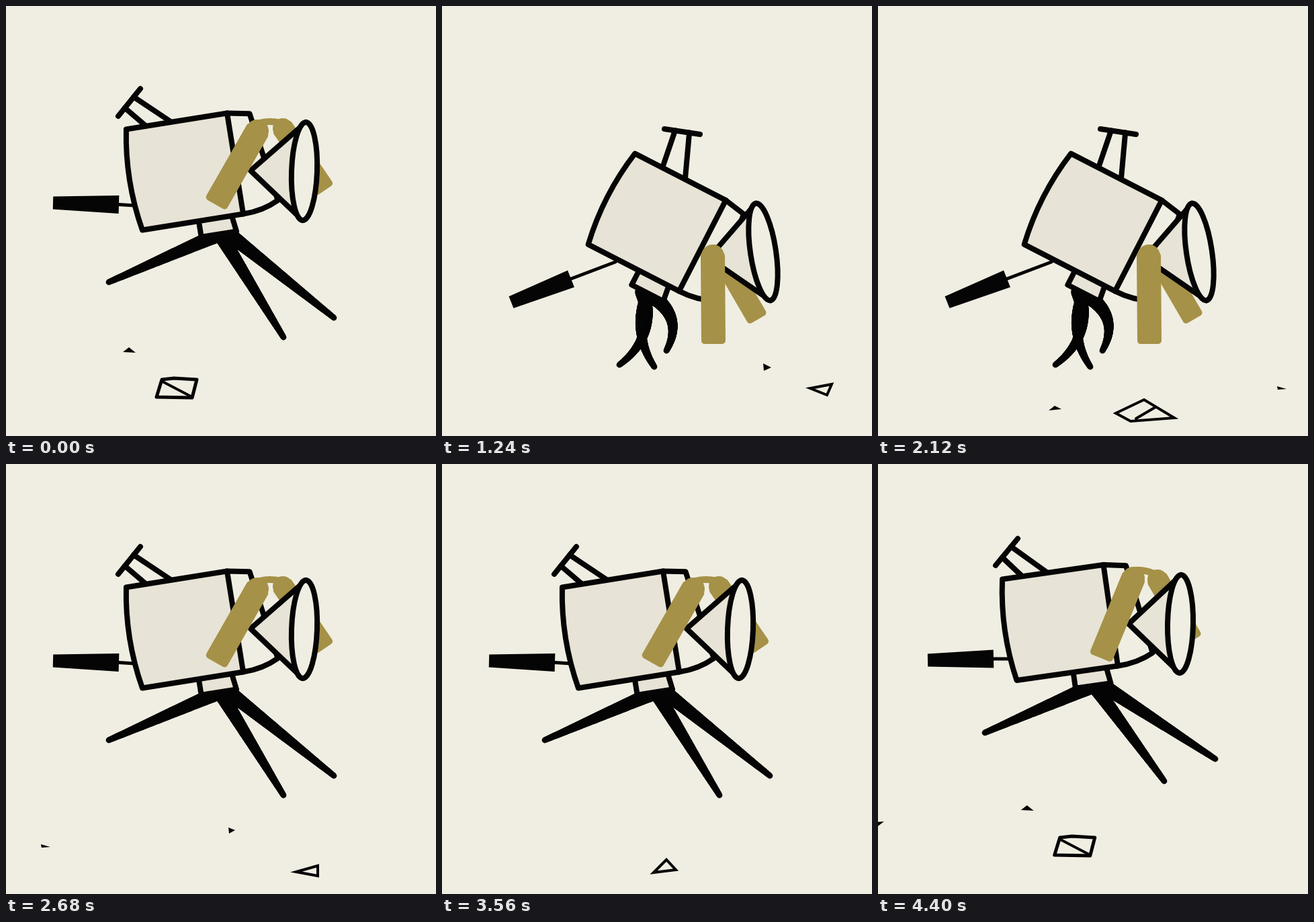
Recreate the animation shown at these times as an HTML page with a canvas. Size 640 by 640 pixels, loop 4.44 s.

```html
<!DOCTYPE html>
<html lang="en">
<head>
<meta charset="utf-8">
<title>Galloping camera</title>
<style>
html, body { margin: 0; width: 100%; height: 100%; overflow: hidden; background: #f0eee2; }
canvas { display: block; width: 100vmin; height: 100vmin; }
</style>
</head>
<body>
<canvas id="stage" width="640" height="640"></canvas>
<script>
const ctx = document.getElementById('stage').getContext('2d');
const PAPER = '#f0eee2', CREAM = '#e7e3d6', INK = '#060505', GOLD = '#a59147';
const LOOP = 4440, STEP = 40, STRIDE = LOOP / 5, DRAWINGS = 22, SPEED = 0.968;

// Each pose: body x y angle | lens x y angle, apex | handle bar, post | grip, rope end |
// three legs (tip, bend) | near strap, far strap
const reach = [266, 246.5, -9.1, 444, 246, 2, 364, 245,
  200, 123, 167, 164, -8, 70, 293, 168, 295.5, 192, 297,
  153, 411, 0, 413, 493, 0, 488, 464, 0,
  374, 186, 314, 291, 412, 182, 472, 270];
const gather = [320, 322, 27.2, 478, 366, -8.5, 397, 375,
  384, 191, 331, 183, 8, 103, 441, 192, 406, 258, 381,
  264, 534, 41, 316, 537, -30, 334, 513, 34,
  403, 372, 404, 498, 425, 388, 468, 462];
const leap = [299, 207, -1.9, 477.5, 217, 0, 394, 216,
  261, 71, 219, 103, -3, 104, 316, 196, 289, 224, 283,
  200, 420, 6, 478, 390, 0, 545, 338, 0,
  409, 158, 438, 277, 421, 152, 434, 242];
const fall = [271, 236, -8.1, 450, 238, 1, 373, 238,
  208, 111, 175, 151, -8, 74, 292, 172, 290, 195, 290,
  159, 400, 0, 426, 472, 0, 502, 439, 0,
  380, 170, 333, 284, 416, 172, 466, 258];
const poses = [reach, gather, leap, fall], keys = [0, 8, 14, 21];

// Ground shards: time at which the points apply, outline, optional inner line
const shards = [
  { at: 0, pts: [174, 515, 183, 508, 193, 516] },
  { at: 0, pts: [232, 556, 250, 554, 284, 556, 277, 583, 224, 582], line: [233, 559, 277, 582] },
  { at: 600, pts: [144, 615, 154, 610, 163, 618] },
  { at: 600, pts: [373, 512, 385, 513, 377, 518] },
  { at: 600, pts: [534, 611, 540, 602, 557, 605] },
  { at: 1240, pts: [478, 532, 490, 538, 479, 543] },
  { at: 1240, pts: [548, 569, 580, 563, 573, 579], line: [] },
  { at: 2120, pts: [254, 602, 263, 595, 273, 600] },
  { at: 2120, pts: [354, 606, 396, 586, 441, 613, 376, 618], line: [384, 614, 413, 597] },
  { at: 2120, pts: [594, 566, 608, 570, 595, 571] },
  { at: 2680, pts: [331, 541, 341, 545, 332, 550] },
  { at: 2680, pts: [432, 607, 464, 598, 464, 613], line: [] },
  { at: 3560, pts: [315, 608, 334, 589, 348, 604], line: [] },
  { at: 4400, pts: [-12, 534, 9, 532, 0, 539] }
];

const mod = (a, n) => ((a % n) + n) % n;

function paint(fill, width, stroke = INK) {
  if (fill) { ctx.fillStyle = fill; ctx.fill(); }
  if (width) { ctx.lineWidth = width; ctx.strokeStyle = stroke; ctx.stroke(); }
}

function trace(pts, closed) {
  ctx.beginPath();
  for (let i = 0; i < pts.length; i += 2) ctx.lineTo(pts[i], pts[i + 1]);
  if (closed) ctx.closePath();
}

function line(pts, width) { trace(pts); paint(null, width); }

// Four corners of a bar between two points with a half width at each end
function bar(ax, ay, bx, by, ha, hb) {
  const len = Math.hypot(bx - ax, by - ay), nx = (ay - by) / len, ny = (bx - ax) / len;
  trace([ax + nx * ha, ay + ny * ha, bx + nx * hb, by + ny * hb,
    bx - nx * hb, by - ny * hb, ax - nx * ha, ay - ny * ha], true);
}

// Cyclic cubic through the key poses
function poseAt(d) {
  const n = keys.length;
  const key = i => keys[mod(i, n)] + Math.floor(i / n) * DRAWINGS;
  let k = n - 1;
  while (keys[k] > d) k--;
  const h = key(k + 1) - key(k), s = (d - key(k)) / h;
  return reach.map((_, j) => {
    const val = i => poses[mod(i, n)][j];
    const rate = i => (val(i + 1) - val(i)) / (key(i + 1) - key(i));
    const slope = i => {
      const before = key(i) - key(i - 1), after = key(i + 1) - key(i);
      return (after * rate(i - 1) + before * rate(i)) / (before + after);
    };
    const a = val(k), b = val(k + 1), r = 1 - s;
    return a * (1 + 2 * s) * r * r + b * s * s * (3 - 2 * s)
      + h * s * r * (slope(k) * r - slope(k + 1) * s);
  });
}

function leg(base, x, y, bend) {
  const [bx, by] = base, dx = x - bx, dy = y - by, len = Math.hypot(dx, dy);
  const cx = (bx + x) / 2 + dy / len * bend, cy = (by + y) / 2 - dx / len * bend;
  ctx.fillStyle = INK;
  for (let i = 0; i <= 120; i++) {
    const s = i / 120, r = 1 - s;
    ctx.beginPath();
    ctx.arc(r * r * bx + 2 * r * s * cx + s * s * x, r * r * by + 2 * r * s * cy + s * s * y,
      11 - 6.6 * s, 0, 7);
    ctx.fill();
  }
}

function strap(ax, ay, bx, by, half) {
  bar(ax, ay, bx, by, half - 5, half - 5);
  paint(GOLD, 10, GOLD);
  ctx.beginPath();
  ctx.arc(ax, ay, half - 1, 0, 7);
  paint(GOLD);
}

function drawCamera(p) {
  const [cx, cy, deg, lx, ly, lensDeg, ax, ay, h1x, h1y, h2x, h2y, post,
    g1x, g1y, g2x, g2y, rx, ry] = p;
  const legs = p.slice(19, 28), near = p.slice(28, 32), far = p.slice(32);
  const rad = deg * Math.PI / 180, cos = Math.cos(rad), sin = Math.sin(rad);
  const at = (x, y) => [cx + x * cos - y * sin, cy + x * sin + y * cos];
  const corner = (...xy) => ctx.lineTo(...at(...xy));
  const curve = (qx, qy, x, y) => ctx.quadraticCurveTo(...at(qx, qy), ...at(x, y));

  // Crank
  line([g2x, g2y, rx, ry], 5);
  bar(g1x, g1y, g2x, g2y, 9.5, 13.5);
  paint(INK);

  // Tripod
  [28, 38, 50].forEach((x, i) => leg(at(x, 102), ...legs.slice(i * 3, i * 3 + 3)));
  trace([...at(9, 78), ...at(9, 100), ...at(62, 100), ...at(59, 78)]);
  paint(CREAM, 8);

  // Handle
  const dx = h2x - h1x, dy = h2y - h1y;
  line([h1x + dx * 0.3, h1y + dy * 0.3, ...at(post, -76)], 8);
  line([h1x + dx * 0.7, h1y + dy * 0.7, ...at(post - 38, -76)], 8);
  line([h1x, h1y, h2x, h2y], 8);

  // Front panel and box
  ctx.beginPath();
  corner(76, -76); corner(109, -70); corner(130, 64);
  curve(106, 76, 76, 76);
  paint(PAPER, 8);
  ctx.beginPath();
  corner(-76, -76); corner(76, -76); corner(76, 76); corner(-76, 76);
  curve(-90, 0, -76, -76);
  ctx.closePath();
  paint(CREAM, 8);

  // Far strap and the band joining the two
  strap(...far, 16);
  const [nx, ny] = near, [fx, fy] = far;
  ctx.beginPath();
  ctx.moveTo(nx + 3, ny - 12);
  ctx.quadraticCurveTo((nx + fx) / 2, (ny + fy) / 2 - 14, fx - 3, fy - 8);
  paint(null, 10, GOLD);

  // Lens hood
  const tilt = lensDeg * Math.PI / 180, ox = Math.sin(tilt) * 73, oy = Math.cos(tilt) * 73;
  trace([lx + ox, ly - oy, ax, ay, lx - ox, ly + oy]);
  paint(CREAM, 8);
  ctx.beginPath();
  ctx.ellipse(lx, ly, 19, 73, tilt, 0, 7);
  paint(PAPER, 8);

  strap(...near, 18);
}

function drawShard({ at, pts, line: inner }, t) {
  const dx = mod(SPEED * (at - t) + SPEED * LOOP / 2, SPEED * LOOP) - SPEED * LOOP / 2;
  ctx.save();
  ctx.translate(dx, 0);
  trace(pts, true);
  if (inner) {
    ctx.lineJoin = pts.length > 8 ? 'round' : 'miter';
    paint(null, pts.length > 8 ? 5 : 4);
    if (inner.length) line(inner, 4);
  } else paint(INK);
  ctx.restore();
}

function frame(now) {
  const t = Math.floor((now % LOOP) / STEP) * STEP;
  ctx.fillStyle = PAPER;
  ctx.fillRect(0, 0, 640, 640);
  ctx.lineCap = ctx.lineJoin = 'round';
  shards.forEach(s => drawShard(s, t));
  drawCamera(poseAt(Math.floor((t % STRIDE) / STRIDE * DRAWINGS)));
}

const start = performance.now();
function tick() {
  frame(performance.now() - start);
  requestAnimationFrame(tick);
}
tick();
</script>
</body>
</html>
```
